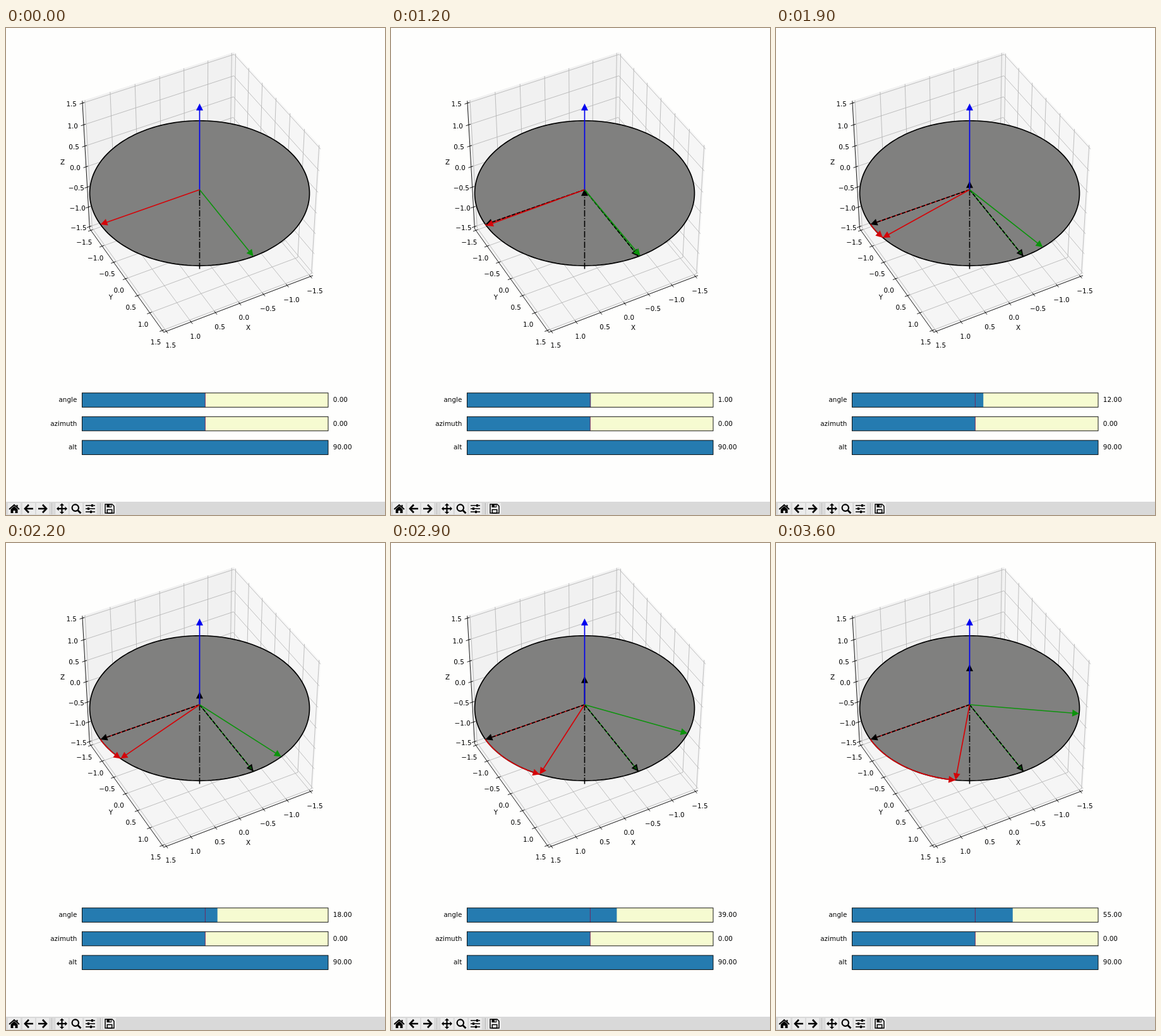
These frames come from a looping animation (600x771 px, 8000 ms). An HTML page with a canvas:

```html
<!DOCTYPE html>
<html lang="en">
<head>
<meta charset="utf-8">
<title>Rotation viewer</title>
<style>
  html, body { margin: 0; width: 100%; height: 100%; overflow: hidden; background: #fefefd; }
  canvas { display: block; width: 600px; height: 771px; }
</style>
</head>
<body>
<canvas id="stage" width="600" height="771"></canvas>
<script>
const ctx = document.getElementById('stage').getContext('2d');
const LOOP = 8000, START = 1200, STEP = 100;
// Slider value in degrees for each step after START
const ANGLES = [1, 2, 2, 4, 6, 8, 10, 12, 14, 16, 18, 21, 24, 26, 29, 37, 37,
                39, 41, 43, 46, 48, 50, 53, 55];
const RED = '#d40409', GREEN = '#0c930c', BLUE = '#0000f0', BLACK = '#000';
const RAD = Math.PI / 180;
const R = 2, L = 1.553;
const TICKS = [-1.5, -1, -0.5, 0, 0.5, 1, 1.5];

// Perspective camera looking at the origin
const AZ = 62 * RAD, SIN_EL = 0.659, COS_EL = 0.752, DIST = 31.2, FOCAL = 2711;
function project(x, y, z) {
  const u = y * Math.cos(AZ) - x * Math.sin(AZ);
  const v = x * Math.cos(AZ) + y * Math.sin(AZ);
  const k = FOCAL / (DIST - v * COS_EL - z * SIN_EL);
  return [306.5 + u * k, 256 + (v * SIN_EL - z * COS_EL) * k];
}
const onCircle = a => project(R * Math.cos(a), R * Math.sin(a), 0);
const ORIGIN = project(0, 0, 0);

function trace(points, closed) {
  ctx.beginPath();
  points.forEach(p => ctx.lineTo(p[0], p[1]));
  if (closed) ctx.closePath();
}

function stroke(points, color, width, dash = []) {
  trace(points);
  ctx.strokeStyle = color;
  ctx.lineWidth = width;
  ctx.setLineDash(dash);
  ctx.stroke();
  ctx.setLineDash([]);
}

function fill(points, color) {
  trace(points, true);
  ctx.fillStyle = color;
  ctx.fill();
}

function arcPoints(from, to, n) {
  return Array.from({ length: n + 1 }, (_, i) => onCircle(from + (to - from) * i / n));
}

function head(from, tip, color, inner = color) {
  const a = Math.atan2(tip[1] - from[1], tip[0] - from[0]);
  ctx.save();
  ctx.translate(tip[0], tip[1]);
  ctx.rotate(a);
  trace([[-1.8, 0], [-10.1, -4.2], [-10.1, 4.2]], true);
  ctx.fillStyle = inner;
  ctx.fill();
  ctx.strokeStyle = color;
  ctx.lineWidth = 1.6;
  ctx.stroke();
  ctx.restore();
}

function arrow(tip, color, width = 1.7) {
  const dx = tip[0] - ORIGIN[0], dy = tip[1] - ORIGIN[1];
  const k = Math.max(0, 1 - 4 / Math.hypot(dx, dy));
  stroke([ORIGIN, [ORIGIN[0] + dx * k, ORIGIN[1] + dy * k]], color, width);
  head(ORIGIN, tip, color);
}

function text(str, x, y, align = 'center') {
  ctx.font = '10.4px "DejaVu Sans", sans-serif';
  ctx.fillStyle = BLACK;
  ctx.textAlign = align;
  ctx.fillText(str, x, y + 3.8);
}

function drawBox() {
  const p = project;
  fill([p(-L, -L, -L), p(-L, L, -L), p(-L, L, L), p(-L, -L, L)], '#f6f6f6');
  fill([p(L, -L, -L), p(-L, -L, -L), p(-L, -L, L), p(L, -L, L)], '#f1f1f1');
  fill([p(L, L, -L), p(-L, L, -L), p(-L, -L, -L), p(L, -L, -L)], '#f5f5f5');

  for (const t of TICKS) {
    const lines = [
      [p(t, L, -L), p(t, -L, -L), p(t, -L, L)],
      [p(L, t, -L), p(-L, t, -L), p(-L, t, L)],
      [p(L, -L, t), p(-L, -L, t), p(-L, L, t)]
    ];
    lines.forEach(l => stroke(l, '#b4b4b4', 0.85));
  }

  stroke([p(L, -L, L), p(L, -L, -L)], BLACK, 0.9);
  stroke([p(L, -L, -L), p(L, L, -L)], BLACK, 0.9);
  stroke([p(L, L, -L), p(-L, L, -L)], BLACK, 0.9);

  const out = L + 0.055, inn = L - 0.04;
  for (const t of TICKS) {
    const label = t.toFixed(1).replace('-', '\u2212');
    stroke([p(t, out, -L), p(t, inn, -L)], BLACK, 0.9);
    stroke([p(out, t, -L), p(inn, t, -L)], BLACK, 0.9);
    stroke([p(out, -L, t), p(inn, -L, t)], BLACK, 0.9);
    const x = p(t, L, -L), y = p(L, t, -L), z = p(L, -L, t);
    text(label, x[0] + 6.9, x[1] + 22.5);
    text(label, y[0] - 10.5, y[1] + 18.5);
    text(label, z[0] - 17.3, z[1] + 1.5);
  }
  text('X', 383.5, 474);
  text('Y', 166, 426.5);
  text('Z', 89.5, 212.5);
}

function drawDisc() {
  const rim = arcPoints(0, 2 * Math.PI, 180);
  fill(rim, '#80807f');
  stroke(rim, BLACK, 1.7);
  stroke([project(0, 0, -R), ORIGIN], BLACK, 1.6, [10, 2.5, 1.6, 2.5]);
}

function dashedArrow(tip, color, inner) {
  stroke([ORIGIN, tip], color, 1.6);
  stroke([ORIGIN, tip], BLACK, 1.7, [5.8, 2.5]);
  head(ORIGIN, tip, BLACK, inner);
}

function drawVectors(deg) {
  const a = deg * RAD;
  if (deg > 0) {
    dashedArrow(onCircle(0), RED, BLACK);
    dashedArrow(onCircle(Math.PI / 2), GREEN, '#0a4a0a');
    arrow(project(0, 0, a), BLACK);
  }
  arrow(project(0, 0, R), BLUE);
  arrow(onCircle(a), RED);
  arrow(onCircle(a + Math.PI / 2), GREEN, 1.6);
  if (deg > 0) {
    stroke(arcPoints(0, a, 40), RED, 1.7);
    if (deg > 2) head(onCircle(a - 3.5 * RAD), onCircle(a), RED);
  }
}

function slider(y, label, value, frac, marked) {
  const x = 120.5, w = 389.5, h = 22.5;
  ctx.fillStyle = '#f6fbd1';
  ctx.fillRect(x, y, w, h);
  ctx.fillStyle = '#257bb0';
  ctx.fillRect(x, y, w * frac, h);
  if (marked) stroke([[315.4, y], [315.4, y + h]], '#7a2058', 0.9);
  ctx.strokeStyle = BLACK;
  ctx.lineWidth = 0.9;
  ctx.strokeRect(x, y, w, h);
  text(label, 112.3, y + 10.6, 'right');
  text(value.toFixed(2), 517.8, y + 10.6, 'left');
}

function drawSliders(deg) {
  slider(577.8, 'angle', deg, 0.5 + deg / 360, true);
  slider(615.3, 'azimuth', 0, 0.5, true);
  slider(652.9, 'alt', 90, 1, false);
}

// Toolbar icons, each drawn around its own centre
const ICONS = [
  [13, () => {
    stroke([[-8, 1], [0, -6], [8, 1]], BLACK, 2);
    fill([[-5.5, 1], [0, -4], [5.5, 1], [5.5, 7], [1.5, 7], [1.5, 3], [-1.5, 3], [-1.5, 7], [-5.5, 7]], BLACK);
    fill([[3.5, -6], [5.5, -6], [5.5, -1], [3.5, -3]], BLACK);
  }],
  [36, () => chevron(-1)],
  [58, () => chevron(1)],
  [88.5, () => {
    stroke([[-6, 0], [6, 0]], BLACK, 2.2);
    stroke([[0, -6], [0, 6]], BLACK, 2.2);
    for (let i = 0; i < 4; i++) {
      ctx.rotate(Math.PI / 2);
      fill([[8.5, 0], [5, -3.6], [5, 3.6]], BLACK);
    }
  }],
  [111, () => {
    ctx.beginPath();
    ctx.arc(-1.2, -1.4, 5.2, 0, 2 * Math.PI);
    ctx.strokeStyle = BLACK;
    ctx.lineWidth = 2.2;
    ctx.stroke();
    stroke([[2.6, 2.4], [7.5, 7.3]], BLACK, 2.8);
  }],
  [133.5, () => {
    [[-5, 3], [0, -3], [5, 1]].forEach(([y, x]) => {
      stroke([[-7.5, y], [7.5, y]], BLACK, 1.5);
      ctx.fillStyle = BLACK;
      ctx.fillRect(x - 1.5, y - 2, 3, 4);
    });
  }],
  [164, () => {
    trace([[-7, -7], [4, -7], [7, -4], [7, 7], [-7, 7]], true);
    ctx.strokeStyle = BLACK;
    ctx.lineWidth = 1.5;
    ctx.stroke();
    ctx.strokeRect(-3.7, 1.5, 7.4, 5.5);
    ctx.fillStyle = BLACK;
    ctx.fillRect(-4.5, -7, 7.5, 5);
    ctx.fillStyle = '#ececec';
    ctx.fillRect(0, -6, 1.8, 3);
  }]
];

function chevron(dir) {
  stroke([[-7 * dir, 0], [5 * dir, 0]], BLACK, 2.5);
  stroke([[0, -6.3], [6 * dir, 0], [0, 6.3]], BLACK, 2.7);
}

function drawToolbar() {
  ctx.fillStyle = '#d9d9d9';
  ctx.fillRect(0, 750, 600, 21);
  for (const [x, icon] of ICONS) {
    ctx.fillStyle = '#ececec';
    ctx.fillRect(x - 10, 752, 20, 18);
    ctx.save();
    ctx.translate(x, 761);
    icon();
    ctx.restore();
  }
  for (const x of [73, 149.5]) {
    stroke([[x, 752], [x, 770]], '#a8a8a8', 0.8);
    stroke([[x + 1, 752], [x + 1, 770]], '#f2f2f2', 0.8);
  }
}

function angleAt(time) {
  if (time < START) return 0;
  return ANGLES[Math.min(ANGLES.length - 1, Math.floor((time - START) / STEP))];
}

const begin = performance.now();
function render() {
  const deg = angleAt((performance.now() - begin) % LOOP);
  ctx.fillStyle = '#fefefd';
  ctx.fillRect(0, 0, 600, 771);
  drawBox();
  drawDisc();
  drawVectors(deg);
  drawSliders(deg);
  drawToolbar();
  requestAnimationFrame(render);
}
render();
</script>
</body>
</html>
```
